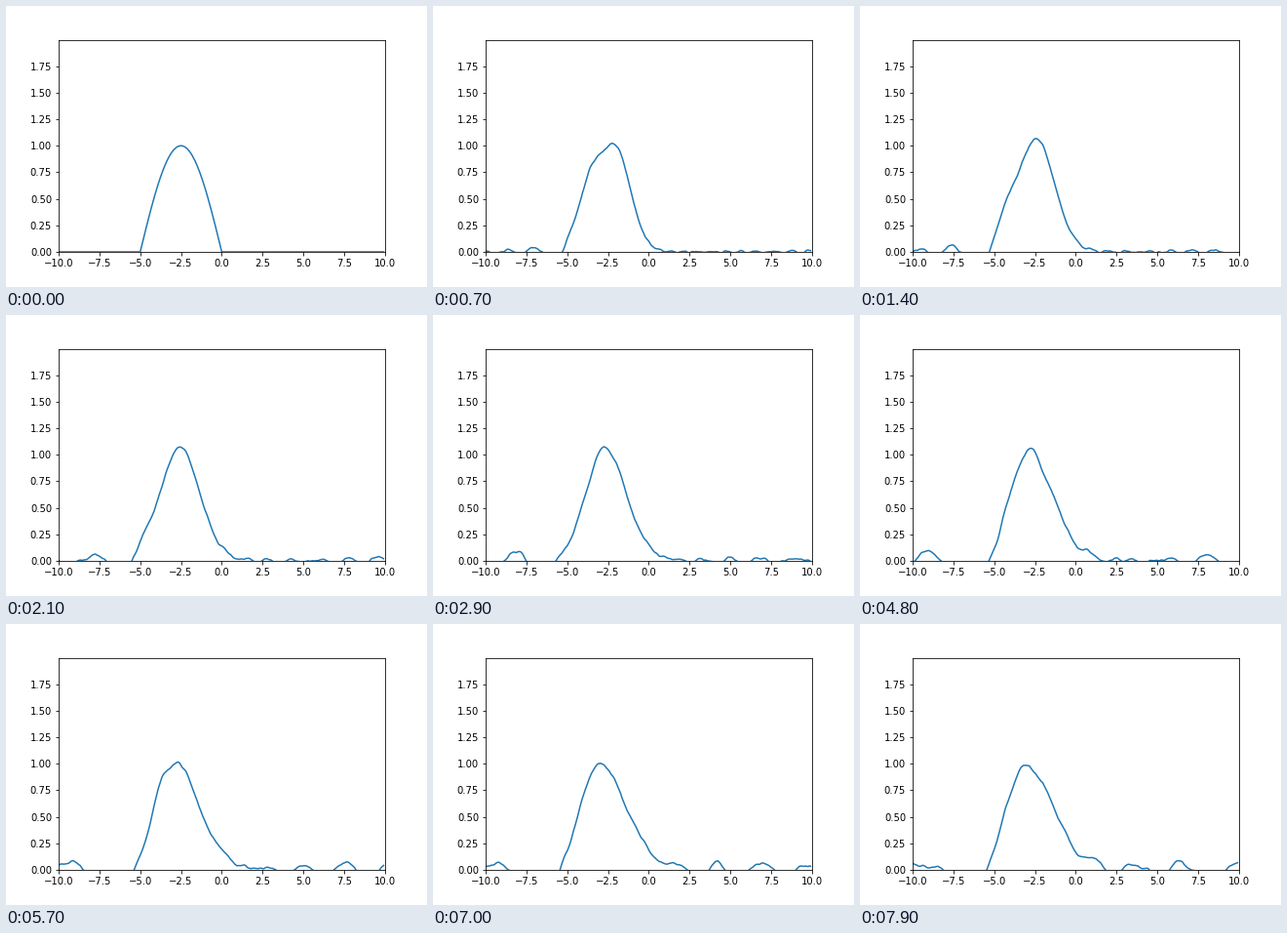
A matplotlib script that plays this animation: 432x288 px, repeating every 8000 ms.

```python
import numpy as np
import matplotlib.pyplot as plt
from matplotlib.animation import FuncAnimation

# Korteweg-de Vries: u_t + u u_x + u_xxx = 0 on a periodic interval
L, N = 20.0, 256
FRAMES, FRAME_DT, SUBSTEPS = 80, 0.01, 20

x = -L / 2 + L / N * np.arange(N)
k = 2 * np.pi * np.fft.rfftfreq(N, L / N)
keep = k < k[-1] * 2 / 3


def advection(v):
    u = np.fft.irfft(v, N)
    return -0.5j * k * keep * np.fft.rfft(u * u)


def solve():
    """Integrating-factor RK4; one row per frame."""
    h = FRAME_DT / SUBSTEPS
    half = np.exp(0.5j * k**3 * h)
    full = half**2
    u0 = np.where((x > -5) & (x < 0), -np.sin(np.pi * x / 5), 0.0)
    v = np.fft.rfft(u0)
    rows = [u0]
    for _ in range(FRAMES - 1):
        for _ in range(SUBSTEPS):
            a = h * advection(v)
            b = h * advection(half * (v + a / 2))
            c = h * advection(half * v + b / 2)
            d = h * advection(full * v + half * c)
            v = full * v + (full * a + 2 * half * (b + c) + d) / 6
        rows.append(np.fft.irfft(v, N))
    return rows


waves = solve()

fig, ax = plt.subplots(figsize=(6, 4), dpi=72)
fig.subplots_adjust(left=0.125, right=0.9, bottom=0.125, top=0.88)
ax.set_xlim(-10, 10)
ax.set_ylim(0, 1.999)
line, = ax.plot(x, waves[0], color="#1f77b4", lw=1.5)


def update(i):
    line.set_ydata(waves[i])
    return line,


anim = FuncAnimation(fig, update, frames=FRAMES, interval=100,
                     repeat=True, repeat_delay=0)
plt.show()
```
